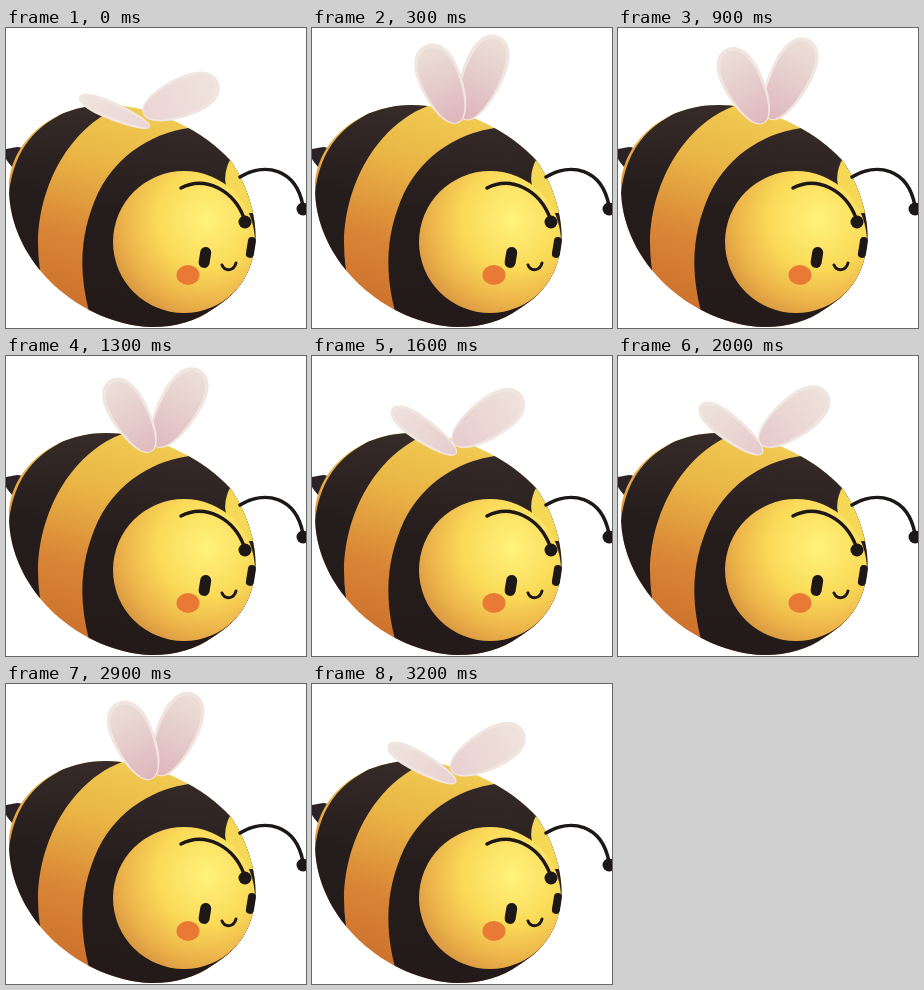
Animation, 300 px wide and 300 px high, one loop 3.3 s. Source, as an HTML page:

```html
<!DOCTYPE html>
<html lang="en">
<head>
<meta charset="utf-8">
<title>Flying bee</title>
<style>
html, body { margin: 0; width: 100%; height: 100%; overflow: hidden; background: #fff; }
svg { display: block; width: 100vw; height: 100vh; }
</style>
</head>
<body>
<svg viewBox="0 0 300 300">
  <defs>
    <linearGradient id="gold" x1=".65" y1="0" x2=".3" y2="1">
      <stop offset="0" stop-color="#f3d255"/><stop offset=".35" stop-color="#e9b445"/>
      <stop offset=".65" stop-color="#da8636"/><stop offset="1" stop-color="#c86c2b"/>
    </linearGradient>
    <linearGradient id="dark" x1=".5" y1="0" x2=".4" y2="1">
      <stop offset="0" stop-color="#382c2a"/><stop offset=".5" stop-color="#251d1c"/>
      <stop offset="1" stop-color="#231a19"/>
    </linearGradient>
    <radialGradient id="skin" cx=".66" cy=".34" r=".78">
      <stop offset="0" stop-color="#fff37c"/><stop offset=".45" stop-color="#fada58"/>
      <stop offset=".75" stop-color="#ecb44a"/><stop offset="1" stop-color="#d38f3d"/>
    </radialGradient>
    <linearGradient id="petal">
      <stop offset="0" stop-color="#dcb0b8"/><stop offset=".45" stop-color="#e3c6c6"/>
      <stop offset="1" stop-color="#eaded6"/>
    </linearGradient>
    <clipPath id="shape">
      <path d="M3 160C3 115 45 77 100 77C150 77 200 105 224 132C243 158 252 195 249 215C246 250 228 268 207 281C190 293 170 299 146 299C75 297 3 235 3 160"/>
    </clipPath>
  </defs>

  <path d="M0 121L11 119Q18 119 15 124L6 139Q1 133 0 131Z" fill="#2a2226"/>
  <g clip-path="url(#shape)">
    <path d="M0 70H260V300H0Z" fill="url(#gold)"/>
    <path d="M3 165C8 125 25 103 52 88L70 70H125L116 78C70 95 33 150 32 215Q32 238 38 262L0 250Z" fill="url(#dark)"/>
    <path d="M192 99C150 102 112 125 92 165C74 205 70 245 88 300H255V80Z" fill="url(#dark)"/>
    <path d="M225 130Q217 144 220 158L236 185H260V130Z" fill="#f6d857"/>
    <circle cx="178" cy="214" r="71" fill="url(#skin)"/>
  </g>

  <g fill="none" stroke="#1d1717" stroke-width="3.5" stroke-linecap="round">
    <path d="M175 160C200 147 228 163 238 190"/>
    <path d="M234 149C258 134 290 140 297 178"/>
    <path d="M216 237C219 244 228 243 230 235" stroke-width="3"/>
  </g>
  <g fill="#1d1717">
    <circle cx="239" cy="194" r="6.500"/>
    <circle cx="297" cy="181" r="6.500"/>
    <rect x="193.500" y="219" width="11" height="21" rx="5.500" transform="rotate(9 199 229)"/>
    <rect x="241" y="209" width="8" height="21" rx="4" transform="rotate(9 245 219)"/>
  </g>
  <ellipse cx="182" cy="247" rx="11.500" ry="10" fill="#e87a35"/>

  <g id="right"><path fill="#f1e5e0"/><path fill="url(#petal)"/></g>
  <g id="left"><path fill="#f1e5e0"/><path fill="url(#petal)"/></g>
</svg>
<script>
const STEP = 100, LOOP = 3300;
const DRIFT = 24; // steps until the beat falls back into phase

// Lowered and raised pose of each wing
const wings = {
  left: [{ x: 144, y: 99, length: 77, angle: 203, half: 9 },
         { x: 146, y: 95, length: 85, angle: 250, half: 22 }],
  right: [{ x: 137, y: 86, length: 82, angle: 337, half: 20 },
          { x: 153, y: 92, length: 91, angle: 290, half: 21 }]
};

// One beat takes two steps; it slips a little with each until it resets
function liftAt(step) {
  const slip = .016 * (step % DRIFT);
  return step % 2 ? 1 - slip : slip;
}

// Teardrop along the x axis, running from the base to the tip
function petal(start, end, h) {
  const x = f => start + f * (end - start);
  const side = `${x(0)} ${-h * .7} ${x(.38)} ${-h * 1.05} ${x(.66)} ${-h}`;
  return `M${x(0)} 0C${side}C${x(.88)} ${-h * .95} ${x(1)} ${-h * .55} ${x(1)} 0` +
         `C${x(1)} ${h * .55} ${x(.88)} ${h * .95} ${x(.66)} ${h}` +
         `C${x(.38)} ${h * 1.05} ${x(0)} ${h * .7} ${x(0)} 0Z`;
}

function drawWing(id, lift) {
  const [low, high] = wings[id];
  const mix = key => low[key] + (high[key] - low[key]) * lift;
  const length = mix("length"), half = mix("half");
  const wing = document.getElementById(id);
  wing.setAttribute("transform", `translate(${mix("x")} ${mix("y")}) rotate(${mix("angle")})`);
  const [rim, face] = wing.children;
  rim.setAttribute("d", petal(0, length, half));
  face.setAttribute("d", petal(1, length - 4, half - 3));
  face.setAttribute("opacity", .3 + .65 * lift);
}

function frame(now) {
  const lift = liftAt(Math.floor(now % LOOP / STEP));
  drawWing("left", lift);
  drawWing("right", lift);
  requestAnimationFrame(frame);
}
frame(0);
</script>
</body>
</html>
```
